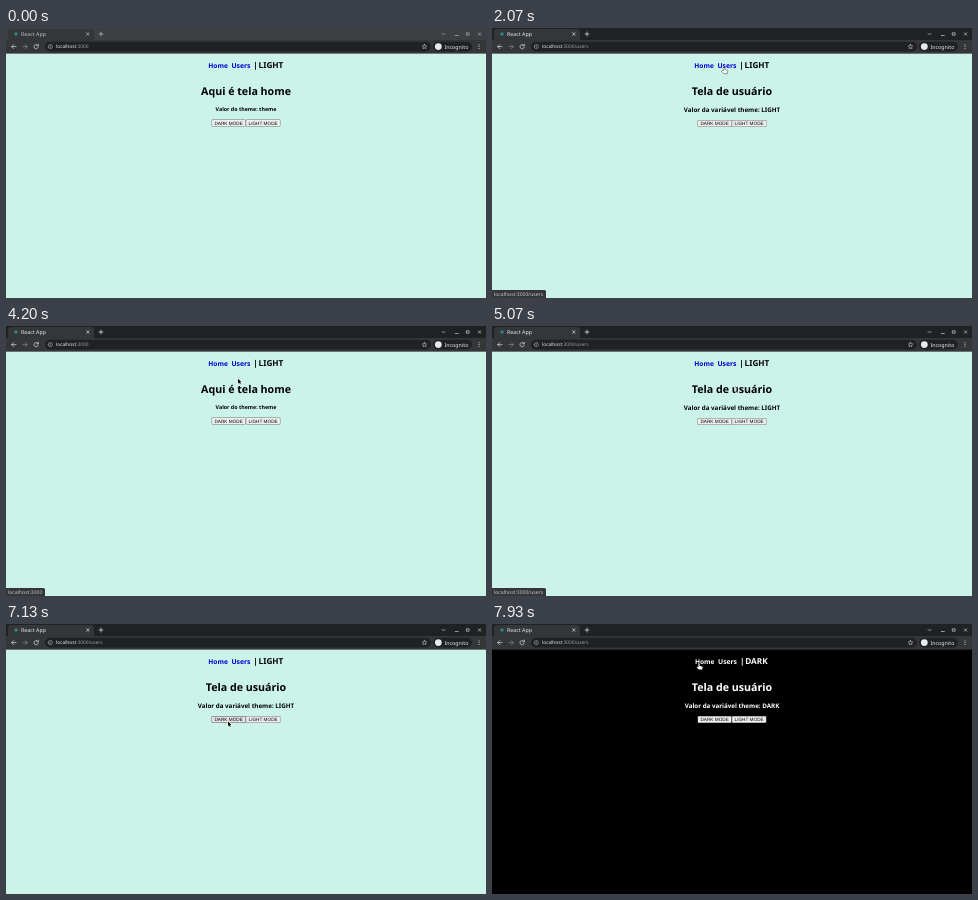
Write an HTML page with a canvas that moves like this. It is 480x270 px and loops after 8000 ms.

```html
<!DOCTYPE html>
<html lang="pt">
<head>
<meta charset="utf-8">
<title>React App</title>
<style>
  html, body { margin: 0; height: 100%; overflow: hidden; background: #cbf3e9; }
  canvas { display: block; width: 100vw; height: 100vh; }
</style>
</head>
<body>
<canvas></canvas>
<script>
const LOOP = 8000, STEP = 200 / 3;
const canvas = document.querySelector('canvas');
const ratio = window.devicePixelRatio || 1;
canvas.width = 480 * ratio;
canvas.height = 270 * ratio;
const ctx = canvas.getContext('2d');
ctx.scale(ratio, ratio);
ctx.textRendering = 'geometricPrecision';
ctx.lineCap = ctx.lineJoin = 'round';

const SANS = '"Noto Sans", "Open Sans", sans-serif';
const ARIAL = '"Liberation Sans", Arial, sans-serif';

// Pointer hot spot: time, x, y
const pointerPath = [
  [333, 262, 128], [600, 248, 92], [867, 222, 52], [1133, 214, 39.5],
  [1333, 214, 39.5], [1467, 231, 39], [1667, 233, 39], [1933, 232, 39.5],
  [2267, 232, 39.5], [2533, 264, 50], [2800, 260, 57],
  [3000, 260, 57], [3533, 215.5, 37.3], [4000, 215.5, 37.3], [4333, 241, 61],
  [4400, 241, 61], [4467, 229, 37.5], [4800, 230, 38],
  [5067, 244.5, 63.5], [5467, 255.5, 93.5],
  [5667, 255.5, 93.5], [5933, 260, 40], [6200, 242, 72], [6467, 223, 101],
  [6600, 222, 99], [6733, 222, 97.5],
  [7600, 222, 97.5], [7933, 207, 39.5], [8000, 207, 39.5]
];

const pages = [[0, 'home'], [2067, 'users'], [3867, 'home'], [4800, 'users']];
const statuses = [
  [0, ''], [1067, 'localhost:3000'], [1400, 'localhost:3000/users'], [2667, ''],
  [3667, 'localhost:3000'], [4267, ''], [4667, 'localhost:3000/users'], [5267, '']
];

const valueAt = (list, t) => list.filter(([start]) => start <= t).pop()[1];

function pointerAt(t) {
  if (t < pointerPath[0][0]) return null;
  const i = Math.max(1, pointerPath.findIndex(p => p[0] >= t));
  const [t0, x0, y0] = pointerPath[i - 1], [t1, x1, y1] = pointerPath[i];
  const k = (t - t0) / (t1 - t0);
  const e = k * k * (3 - 2 * k);
  return { x: x0 + (x1 - x0) * e, y: y0 + (y1 - y0) * e };
}

function text(str, x, y, size, color, { weight = 400, align = 'left', family = SANS } = {}) {
  ctx.font = `${weight} ${size}px ${family}`;
  ctx.textAlign = align;
  ctx.fillStyle = color;
  ctx.fillText(str, x, y);
  return ctx.measureText(str).width;
}

function rect(x, y, w, h, color, radius = 0) {
  ctx.fillStyle = color;
  ctx.beginPath();
  ctx.roundRect(x, y, w, h, radius);
  ctx.fill();
}

function circle(x, y, r, color) {
  ctx.fillStyle = color;
  ctx.beginPath();
  ctx.arc(x, y, r, 0, 7);
  ctx.fill();
}

function stroke(d, color = '#dadce0', width = 0.7) {
  ctx.strokeStyle = color;
  ctx.lineWidth = width;
  ctx.stroke(new Path2D(d));
}

function drawBrowser(active, page) {
  const ink = active ? '#e8eaed' : '#bdc1c6';
  rect(0, 0, 480, 12.5, active ? '#202124' : '#3c4043');
  rect(2, 1, 86, 12, '#35363a', [3, 3, 0, 0]);
  rect(0, 12, 480, 13.5, '#35363a');
  circle(10, 6, 1.8, '#2b8580');
  text('React App', 15, 7.9, 5.3, ink);
  stroke('M80.5 4.7l2.6 2.6m0-2.6l-2.6 2.6M93 6h4m-2-2v4', ink);
  stroke('M436 5.4l1.5 1.5l1.5-1.5M449.3 7.5h3M460.7 4.8h2.4v2.4h-2.4zM472.4 4.8l2.4 2.4m0-2.4l-2.4 2.4', ink, 0.6);

  stroke('M10 18.6H5.7m2-2l-2 2l2 2');
  stroke('M17 18.6h4.3m-2-2l2 2l-2 2', '#85888c');
  stroke('M32 17.4a2.2 2.2 0 1 0 .3 1.8M32.3 16.2v1.6h-1.6');
  rect(39, 13.7, 386, 9.8, '#202124', 4.9);
  stroke('M42.2 18.6a2.1 2.1 0 1 0 4.2 0a2.1 2.1 0 1 0 -4.2 0M44.3 18.5v1m0-2v.01', '#bdc1c6', 0.5);
  const hostWidth = text('localhost', 50, 20.4, 4.8, '#e8eaed');
  text(':3000' + (page === 'users' ? '/users' : ''), 50 + hostWidth, 20.4, 4.8, '#9aa0a6');
  stroke('M418.5 16.3l.7 1.5l1.6.2l-1.2 1.1l.3 1.6l-1.4-.8l-1.4.8l.3-1.6l-1.2-1.1l1.6-.2z', '#dadce0', 0.5);
  rect(427, 13.7, 39, 9.8, '#202124', 4.9);
  circle(432.3, 18.6, 3.4, '#e8eaed');
  text('Incognito', 438.5, 20.5, 5.3, '#e8eaed');
  for (const y of [16.8, 18.6, 20.4]) circle(473, y, 0.5, '#e8eaed');
}

function drawButton(label, x, y, w, hovered) {
  rect(x, y, w, 6.8, hovered ? '#505050' : '#767676', 0.9);
  rect(x + 0.45, y + 0.45, w - 0.9, 5.9, hovered ? '#e5e5e5' : '#efefef', 0.6);
  text(label, x + w / 2, y + 5.1, 4.7, '#000', { align: 'center', family: ARIAL });
}

function drawPage(page, dark, pointer) {
  const ink = dark ? '#fff' : '#000';
  const link = dark ? '#fff' : '#0000d4';
  const bold = { weight: 700 }, centered = { weight: 700, align: 'center' };
  const theme = dark ? 'DARK' : 'LIGHT';
  const shift = dark ? 0.6 : 0;
  rect(0, 25.5, 480, 244.5, dark ? '#000' : '#cbf3e9');
  text('Home', 202.3 + shift, 40.3, 6.6, link, bold);
  text('Users', 225.4 + shift, 40.3, 6.8, link, bold);
  text('|', 247.3 + shift, 40.4, 8.1, ink, bold);
  text(theme, 252.6 + shift, 40.4, 8.2, ink, bold);

  const home = page === 'home';
  text(home ? 'Aqui é tela home' : 'Tela de usuário', 240, 67.2, 10.67, ink, centered);
  if (home) text('Valor do theme: theme', 240, 82.8, 5.32, ink, centered);
  else text('Valor da variável theme: ' + theme, 240, 83.5, 6.24, ink, centered);

  const top = home ? 91.6 : 92.1;
  const over = (x, w) => !!pointer && pointer.y > top && pointer.y < top + 7 &&
    pointer.x > x && pointer.x < x + w;
  drawButton('DARK MODE', 205.6, top, 34, over(205.6, 34));
  drawButton('LIGHT MODE', 239.8, top, 34.6, over(239.8, 34.6));
}

function drawStatus(label) {
  if (!label) return;
  rect(0, 262, label.length > 14 ? 54 : 39, 8, '#35363a', [0, 1.5, 0, 0]);
  text(label, 2, 267.8, 5.07, '#c4c7cb');
}

const shapes = {
  arrow: 'M0 0v4.8l1.15-1l.8 1.8l.8-.35l-.8-1.75h1.5z',
  hand: 'M-.6 .4q.6-.8 1.2 0v2l2.4.5q.7.2.6 1l-.4 2.2h-3.4l-2-2.4q.2-.8 1-.4l.6.4z'
};

function drawPointer({ x, y }) {
  const onLink = y > 35 && y < 42 && ((x > 202 && x < 223) || (x > 225 && x < 245));
  const onText = (y > 57 && y < 69 && x > 195 && x < 285) || (y > 78 && y < 85 && x > 192 && x < 288) ||
    (y > 34 && y < 42 && x > 248 && x < 278);
  ctx.save();
  ctx.translate(x, y);
  if (onText && !onLink) {
    const beam = 'M-1-2.6q1 0 1 .7q0-.7 1-.7M-1 2.6q1 0 1-.7q0 .7 1 .7M0-2v4';
    stroke(beam, '#fff', 1.1);
    stroke(beam, '#000', 0.55);
  } else {
    const shape = new Path2D(shapes[onLink ? 'hand' : 'arrow']);
    ctx.strokeStyle = onLink ? '#000' : '#fff';
    ctx.lineWidth = 0.7;
    ctx.stroke(shape);
    ctx.fillStyle = onLink ? '#fff' : '#000';
    ctx.fill(shape);
  }
  ctx.restore();
}

function draw(now) {
  // The screen refreshes fifteen times a second
  const t = Math.floor((now % LOOP + 5) / STEP) * STEP;
  const page = valueAt(pages, t + 1);
  const pointer = pointerAt(Math.min(t, LOOP));
  drawPage(page, t > 7260, pointer);
  drawBrowser(t > 330, page);
  drawStatus(valueAt(statuses, t + 1));
  if (pointer) drawPointer(pointer);
}

const start = performance.now();
function tick() {
  draw(performance.now() - start);
  requestAnimationFrame(tick);
}
tick();
</script>
</body>
</html>
```
